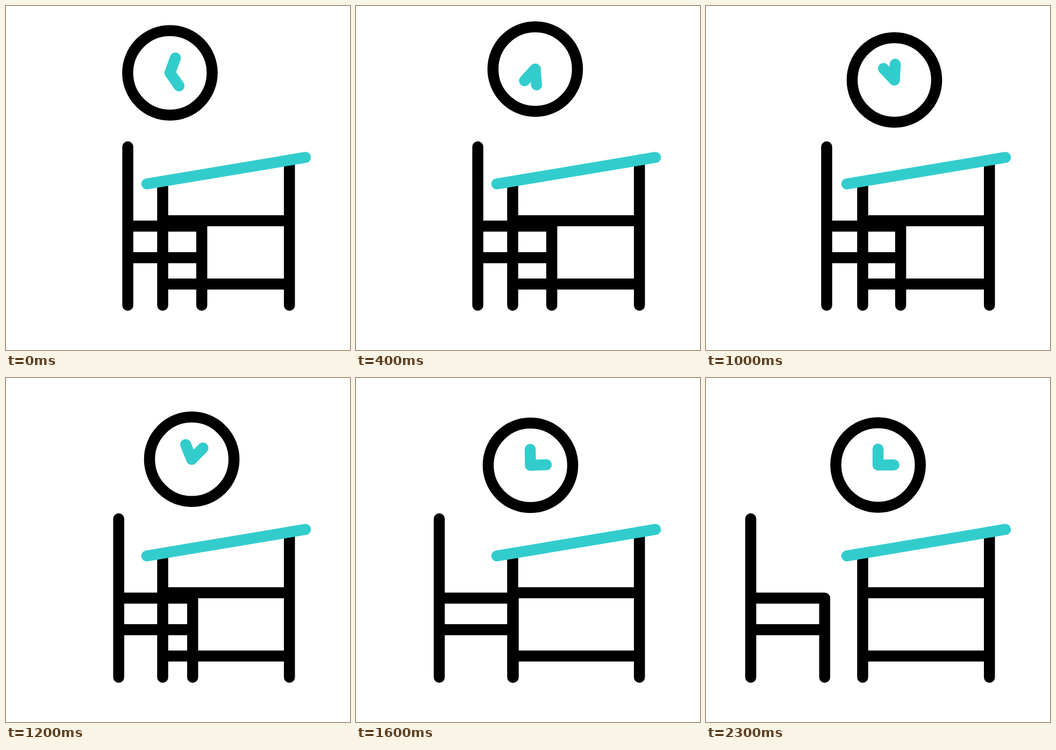
An HTML page that plays this animation: 640x640 px, repeating every 2400 ms.

```html
<!DOCTYPE html>
<html lang="en">
<head>
<meta charset="utf-8">
<title>Desk and clock</title>
<style>
  html, body { margin: 0; width: 100%; height: 100%; overflow: hidden; background: #fff; }
  svg { display: block; width: 100%; height: 100%; }
  .ink { fill: none; stroke: #000; stroke-width: 20.5; stroke-linecap: round; stroke-linejoin: round; }
  .accent { stroke: #3cc; }
</style>
</head>
<body>
<svg viewBox="0 0 640 640">
  <g id="clock" class="ink">
    <circle r="78.6"/>
    <path id="hour" class="accent" d="M0 0V-29.5"/>
    <path id="minute" class="accent" d="M0 0V-29.5"/>
  </g>
  <path id="chair" class="ink" d="M0 262V556.8M0 409.4H137.6V556.8M0 468.2H137.6"/>
  <path class="ink" d="M291.5 331V556.8M527.3 286.7V556.8M291.5 399.4H527.3M291.5 517.3H527.3"/>
  <path class="ink accent" d="M262 331L557 281.7"/>
</svg>
<script>
const LOOP = 2400, STEP = 100;

// the clock glides along an arc, then swings down to its place
const GLIDE = [[305, 124.4], [327.3, 112.4], [346.6, 120.6]];
const SWING = [[346.6, 120.6], [359, 143], [340.3, 166.1], [320.1, 161.8]];
const GLIDE_END = 600, SWING_END = 1800;
const HANDS_END = 1700, MINUTE_TURN = 430;

const place = (id, transform) =>
  document.getElementById(id).setAttribute("transform", transform);

const progress = (t, from, to) => Math.min(1, Math.max(0, (t - from) / (to - from)));

function smooth(t, from, to) {
  const u = progress(t, from, to);
  return u * u * (3 - 2 * u);
}

const mix = (a, b, u) => a.map((v, i) => v + (b[i] - v) * u);

function bezier(points, u) {
  while (points.length > 1)
    points = points.slice(1).map((p, i) => mix(points[i], p, u));
  return points[0];
}

function draw(t) {
  const center = t < GLIDE_END
    ? bezier(GLIDE, t / GLIDE_END)
    : bezier(SWING, smooth(t, GLIDE_END, SWING_END));
  // degrees the minute hand still has to turn
  const left = MINUTE_TURN * (1 - Math.cos(Math.PI / 2 * (1 - progress(t, 0, HANDS_END))));
  place("clock", `translate(${center})`);
  place("minute", `rotate(${90 - left})`);
  place("hour", `rotate(${-left / 2})`);
  place("chair", `translate(${226.6 - 143.4 * smooth(t, 900, 2300)} 0)`);
}

const start = performance.now();
function tick() {
  const t = (performance.now() - start) % LOOP;
  draw(Math.floor(t / STEP) * STEP);
  requestAnimationFrame(tick);
}
tick();
</script>
</body>
</html>
```
